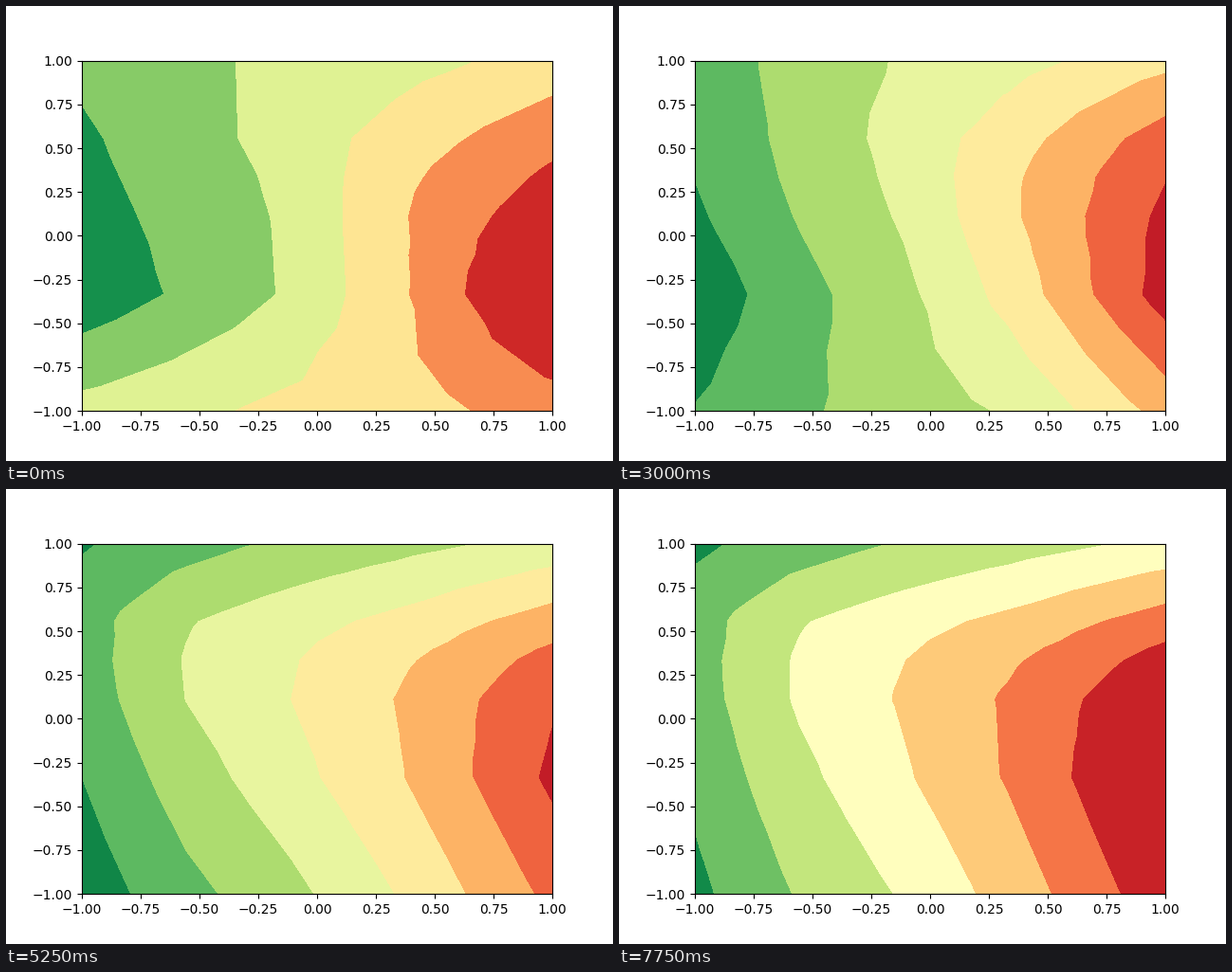
A matplotlib script that plays this animation: 640 by 480 pixels, repeating every 8 s.

```python
import numpy as np
import matplotlib.pyplot as plt
from matplotlib.animation import FuncAnimation
from matplotlib.tri import Triangulation

FRAMES, INTERVAL = 32, 250
NODES = np.linspace(-1, 1, 10)
KNOT_X = [-1, -0.6, -0.15, 0.4, 1]
KNOT_Y = [-1, -0.333, 0.222, 0.556, 1]

grid_x, grid_y = np.meshgrid(NODES, NODES)
mesh = Triangulation(grid_x.ravel(), grid_y.ravel())


def surface(*rows):
    """Bilinear surface through heights at the knots, bottom row first."""
    wide = np.array([np.interp(NODES, KNOT_X, row) for row in rows])
    return np.array([np.interp(NODES, KNOT_Y, col) for col in wide.T]).T


def tilt(lift, slope_x, slope_y):
    return lift + slope_x * grid_x + slope_y * grid_y


# Heights are counted in contour steps.
start = surface([3.35, 3.75, 4.2, 4.7, 5.4],
                [1.3, 2.1, 3.0, 5.0, 7.6],
                [1.7, 2.3, 3.05, 5.1, 6.45],
                [1.85, 2.5, 3.35, 4.55, 5.7],
                [2.2, 2.75, 3.2, 3.65, 4.4])
steep = surface([1.1, 1.85, 2.45, 3.25, 5.4],
                [0.25, 1.55, 2.6, 4.55, 7.45],
                [0.9, 2.0, 3.0, 5.1, 7.1],
                [1.0, 2.15, 3.15, 4.6, 6.4],
                [1.15, 2.2, 2.9, 3.55, 4.55])
bent = surface([0.3, 1.1, 2.05, 3.5, 5.75],
               [0.6, 1.85, 2.8, 4.55, 6.85],
               [1.1, 2.5, 3.5, 4.85, 6.5],
               [1.35, 2.35, 3.2, 4.15, 5.35],
               [0.85, 1.4, 2.05, 2.55, 3.35])
final = surface([0.35, 1.6, 2.6, 4.2, 6.25],
                [1.0, 2.4, 3.55, 5.05, 7.2],
                [1.5, 3.05, 4.0, 5.2, 6.8],
                [1.55, 2.85, 3.55, 4.35, 5.5],
                [0.9, 1.55, 2.15, 2.7, 3.35])

# time, surface, lowest and highest contour level
KEYS = [
    (0, start, 1, 7),
    (2000, steep + tilt(-0.05, 0, -0.1), 0, 8),
    (3000, steep + tilt(0.05, 0, 0.1), 0, 8),
    (4000, bent, 0, 7),
    (5250, final, 0, 8),
    (6750, final + tilt(0.65, -0.1, -0.2), 0, 8),
    (7750, final + tilt(0.14, 0, -0.25), 0, 7),
]

fig, ax = plt.subplots(figsize=(6.4, 4.8), dpi=100)


def draw(frame):
    t = frame * INTERVAL
    before, after = next(pair for pair in zip(KEYS, KEYS[1:])
                         if t <= pair[1][0])
    part = (t - before[0]) / (after[0] - before[0])
    z = (1 - part) * before[1] + part * after[1]
    low, high = (before if part < 0.5 else after)[2:]

    ax.clear()
    ax.tricontourf(mesh, np.clip(z, low + 0.01, high - 0.01).ravel(),
                   levels=np.arange(low, high + 1), cmap="RdYlGn_r")
    ax.set(xlim=(-1, 1), ylim=(-1, 1))
    return []


anim = FuncAnimation(fig, draw, frames=FRAMES, interval=INTERVAL,
                     init_func=lambda: [], repeat=True, repeat_delay=0)
plt.show()
```
